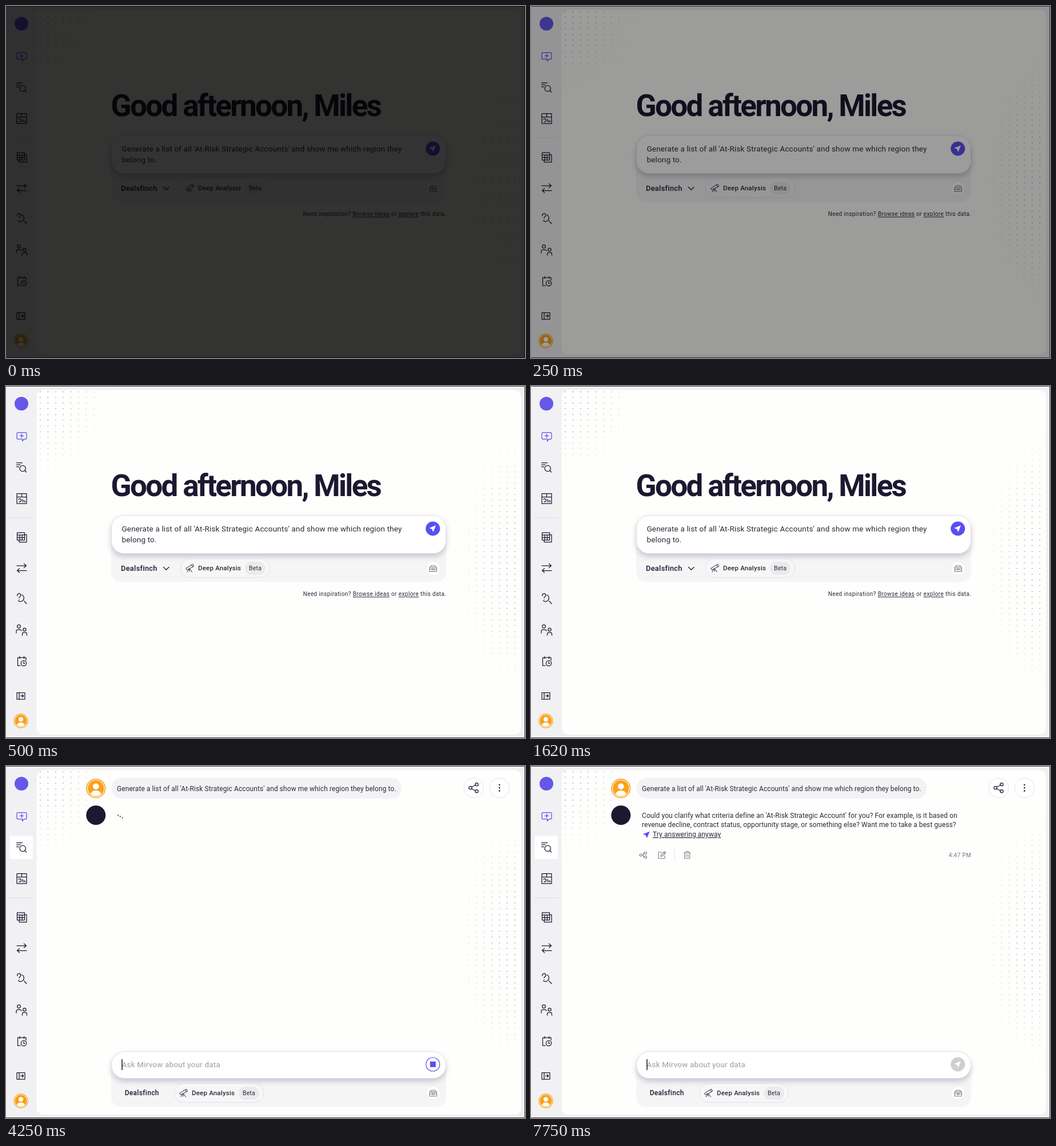
Write an HTML page that moves like this. It is 908x617 px and loops after 8 s.

```html
<!DOCTYPE html>
<html lang="en">
<head>
<meta charset="utf-8">
<title>Assistant chat</title>
<style>
  :root { --ink: #1b1830; --text: #2c2a38; --violet: #5b4ef2; --amber: #f9a11b; --line: #dfdfe6; }
  html, body { margin: 0; width: 100%; height: 100%; overflow: hidden; background: #f1f1f3; }
  svg { display: block; width: 908px; height: 617px; font-family: Roboto, "Open Sans", sans-serif; }
  text { fill: var(--text); }

  .title { font-size: 53px; font-weight: 700; letter-spacing: -2.7px; fill: var(--ink); }
  .prompt { font-size: 13.5px; letter-spacing: .15px; }
  .hint { fill: #9b9ba3; letter-spacing: .2px; }
  .msg { font-size: 12px; letter-spacing: .085px; }
  .source { font-size: 12.8px; font-weight: 500; letter-spacing: .3px; fill: var(--ink); }
  .tool { font-size: 11.5px; font-weight: 500; letter-spacing: .2px; }
  .badge { font-size: 10.5px; letter-spacing: .2px; }
  .small { font-size: 10px; letter-spacing: .4px; }
  .link { text-decoration: underline; text-decoration-color: #8a8a92; text-underline-offset: 2.5px; }

  .icon { fill: none; stroke: var(--ink); stroke-width: 1.25; stroke-linejoin: round; stroke-linecap: round; }
  .thin { stroke-width: .95; }
  .grey { stroke: #7c7c84; stroke-width: 1.1; }
  .violet { stroke: var(--violet); }
  .card { fill: #fff; stroke: var(--line); filter: url(#lift); }
  .tray { fill: #f5f5f6; }
  .ring { fill: #fff; stroke: #e3e3ea; }

  /* All timing is on a grid of 125 ms in a loop of 8 s. */
  .fade, .home, .chat, .wait, .busy, .link-in, .done, .caret { animation: 8s step-end -5ms infinite; }
  .fade { animation-name: fade; }
  .home { animation-name: home; }
  .chat { animation-name: chat; }
  .wait { animation-name: wait; }
  .busy { animation-name: busy; }
  .link-in { animation-name: link-in; }
  .done { animation-name: done; }
  .caret { animation-name: caret; }
  .send { fill: var(--violet); animation: hover 8s linear infinite; }
  .wait circle { animation: bob 1s ease-in-out infinite; }
  .word { fill: transparent; animation: word 8s step-end infinite; }

  @keyframes fade {
    0% { opacity: .8 } 1.5625% { opacity: .6 } 3.125% { opacity: .39 }
    4.6875% { opacity: .19 } 6.25%, 100% { opacity: 0 }
  }
  @keyframes home { 0% { opacity: 1 } 43.75%, 100% { opacity: 0 } }
  @keyframes chat { 0% { opacity: 0 } 43.75%, 100% { opacity: 1 } }
  @keyframes wait { 0% { opacity: 1 } 65.625%, 100% { opacity: 0 } }
  @keyframes busy { 0% { opacity: 1 } 84.375%, 100% { opacity: 0 } }
  @keyframes link-in { 0% { opacity: 0 } 82.8125%, 100% { opacity: 1 } }
  @keyframes done { 0% { opacity: 0 } 84.375%, 100% { opacity: 1 } }
  @keyframes caret {
    0%, 50%, 59.375%, 68.75%, 78.125%, 87.5%, 96.875%, 100% { opacity: 1 }
    45.3125%, 54.6875%, 64.0625%, 73.4375%, 82.8125%, 92.1875% { opacity: 0 }
  }
  @keyframes hover {
    0%, 20% { fill: #5b4ef2 } 28.1%, 34% { fill: #4c40d4 } 40.6%, 100% { fill: #5b4ef2 }
  }
  @keyframes bob { 0%, 100% { transform: translateY(-2.5px) } 50% { transform: translateY(2.5px) } }
  @keyframes word { 0% { fill: #2c2a38 } 35%, 100% { fill: transparent } }
</style>
</head>
<body>
<svg viewBox="0 0 908 617">
  <defs>
    <filter id="lift" x="-5%" y="-30%" width="110%" height="180%">
      <feDropShadow dx="0" dy="5" stdDeviation="5" flood-color="#1b1830" flood-opacity=".2"/>
    </filter>
    <pattern id="dots" x="53.3" y="5" width="13.39" height="10" patternUnits="userSpaceOnUse">
      <circle cx="6.7" cy="5" r="1.15" fill="#c6c6ce"/>
    </pattern>
    <radialGradient id="glow">
      <stop offset=".35" stop-color="#fff"/>
      <stop offset="1" stop-color="#fff" stop-opacity="0"/>
    </radialGradient>
    <mask id="corners">
      <ellipse cx="54" cy="8" rx="140" ry="155" fill="url(#glow)"/>
      <ellipse cx="900" cy="308" rx="118" ry="232" fill="url(#glow)"/>
    </mask>
    <path id="plane" d="M5.6-5.8-6.2-.9-1.2 1 .9 6Z"/>
    <g id="person">
      <circle r="16.2" fill="#fff" stroke="#f9a11b" stroke-width="1.6"/>
      <circle r="14.2" fill="#f9a11b"/>
      <circle cy="-3.6" r="5.3" fill="#fff"/>
      <path d="M-9 9.6C-8 1.6 8 1.6 9 9.6A13 13 0 0 1-9 9.6Z" fill="#fff"/>
    </g>
    <g id="tools">
      <rect x="305.5" y="303" width="156" height="32.5" rx="16.2" fill="#f7f7f8" stroke="#e2e2e9"/>
      <path class="icon thin" d="M315 319.5l9.5-6 2.2 3.6-10 5.2ZM324.5 313.5l2.2-1.2 2 3.5-2 1.3M320 321l-3 5M321.5 320.5l4 5.5M321 321v4"/>
      <text class="tool" x="336" y="323.4">Deep Analysis</text>
      <rect x="418" y="308" width="36" height="23" rx="11.5" fill="#ebebed"/>
      <text class="badge" x="425" y="323.4">Beta</text>
    </g>
    <g id="kit">
      <circle r="12.2" fill="#fff" stroke="#ececf0"/>
      <path class="icon grey" d="M-6.2-2.2H6.2V5.4H-6.2ZM-4.6-2.2-3.4-5H3.4L4.6-2.2M-6.2 1.2H-1.5M1.5 1.2H6.2M-1.5 0H1.5V2.6H-1.5Z"/>
    </g>
  </defs>

  <rect width="908" height="617" fill="#f1f1f3"/>
  <rect x="53.5" y="7" width="847.5" height="604" rx="12" fill="#fefefd"/>
  <rect x="54" y="7" width="841" height="604" fill="url(#dots)" mask="url(#corners)"/>

  <g class="chat">
    <rect x="6.5" y="122.5" width="40.5" height="40.5" rx="3" fill="#fff"/>
  </g>

  <!-- sidebar -->
  <circle cx="27" cy="31" r="12" fill="#6557e8"/>
  <path stroke="#dcdce3" d="M6 231H47"/>
  <g class="icon">
    <path class="violet" d="M21 81.5H34Q36 81.5 36 83.5V91Q36 93 34 93H31.5L28.5 96.5V93H21Q19 93 19 91V83.5Q19 81.5 21 81.5ZM27.5 84V90.5M24.2 87.3H30.8"/>
    <path d="M18.5 134.5H28.5M18.5 138H25M18.5 141.5H22.5M32.9 148.3 35.5 151"/>
    <circle cx="29.2" cy="144.5" r="5.2"/>
    <path d="M19 188.5H36V206H19ZM19 194.5H36M27.5 188.5V194.5M22 198.5A2.6 2.6 0 1 1 23 202.8M29 198.5V203M31.5 200.5V203M33.5 201.5V203"/>
    <path d="M19.5 257H32.5V270H19.5ZM19.5 261.2H32.5M19.5 265.6H32.5M24 261.2V270M28.3 261.2V270M32.5 260.5H36V273.5H23V270"/>
    <path d="M19 315H35.5M31.5 311.5 35.5 315 31.5 318.5M36 323.5H19.5M23.5 320 19.5 323.5 23.5 327"/>
    <path d="M20 367.8A3 3 0 1 1 24.2 369.5Q23 370.2 23 371.5M23 374.3V374.5M28 366A6.2 6.2 0 1 1 21.5 376.5M31.8 377 36 381.5"/>
    <circle cx="22.5" cy="421.5" r="2.8"/>
    <circle cx="32.5" cy="427" r="2.6"/>
    <path d="M18 433V430Q18 427 21 427H24Q26.5 427 27 429M28.5 437V435Q28.5 432.2 31 432.2H34Q36.5 432.2 36.5 435V437"/>
    <path d="M25 490H20.5V476H35V480.5M24 474V477.5M31.5 474V477.5"/>
    <circle cx="31" cy="486" r="4.7"/>
    <path d="M31 483.5V486.3H33"/>
    <path d="M19 537.5H33V549H19ZM23 537.5V549M25.5 543.2H30.5M28.5 541 30.7 543.2 28.5 545.5"/>
  </g>
  <use href="#person" transform="translate(26 587) scale(.75)"/>

  <g class="home">
    <text class="title" x="183.5" y="192.5">Good afternoon, Miles</text>
    <path class="tray" d="M184 270H770V324Q770 343.5 750 343.5H204Q184 343.5 184 324Z"/>
    <rect class="card" x="184.5" y="227" width="585" height="66.5" rx="22"/>
    <text class="prompt">
      <tspan x="202.5" y="255">Generate a list of all 'At-Risk Strategic Accounts' and show me which region they</tspan>
      <tspan x="202.5" y="274.3">belong to.</tspan>
    </text>
    <circle class="send" cx="746.8" cy="250" r="12.5"/>
    <use href="#plane" x="746.5" y="250" fill="#fff"/>
    <text class="source" x="201" y="324.2">Dealsfinch</text>
    <path class="icon" d="M275.5 317.5 280.3 322.3 285 317.5"/>
    <use href="#tools"/>
    <use href="#kit" x="747.3" y="319.7"/>
    <text class="small" x="770.4" y="368.4" text-anchor="end">Need inspiration? <tspan class="link">Browse ideas</tspan> or <tspan class="link">explore</tspan> this data.</text>
  </g>

  <g class="chat">
    <use href="#person" x="157.3" y="39.3"/>
    <rect x="184.5" y="21" width="507.5" height="36" rx="17" fill="#f3f3f5"/>
    <text class="msg" x="194" y="43.7">Generate a list of all 'At-Risk Strategic Accounts' and show me which region they belong to.</text>
    <circle class="ring" cx="818.3" cy="38.3" r="17.2"/>
    <circle class="ring" cx="863.3" cy="38.3" r="17.2"/>
    <g class="icon">
      <path d="M814.5 37 821.5 33.2M814.5 39.8 821.5 43.5"/>
      <circle cx="812.5" cy="38.3" r="2.6"/>
      <circle cx="823.5" cy="32.3" r="2.6"/>
      <circle cx="823.5" cy="44.3" r="2.6"/>
    </g>
    <path d="M863.3 33V33M863.3 38.3V38.3M863.3 43.6V43.6" stroke="#1b1830" stroke-width="2.6" stroke-linecap="round"/>
    <circle cx="157.3" cy="86.3" r="17" fill="#1b1830"/>

    <g class="wait" fill="#1b1830">
      <circle cx="196" cy="88.5" r="1.05" style="animation-delay:-750ms"/>
      <circle cx="199.8" cy="88.5" r="1.05" style="animation-delay:-500ms"/>
      <circle cx="203.6" cy="88.5" r="1.05" style="animation-delay:-250ms"/>
    </g>
    <text class="msg" id="reply"></text>

    <g class="link-in">
      <use href="#plane" x="202" y="120.5" fill="#5b4ef2"/>
      <text class="msg link" x="213" y="124">Try answering anyway</text>
    </g>
    <g class="done">
      <g class="icon grey">
        <circle cx="192" cy="156" r="2"/>
        <circle cx="200.5" cy="152.5" r="2"/>
        <circle cx="200.5" cy="159.5" r="2"/>
        <path d="M194 156H196.5V152.5H198.5M196.5 156V159.5H198.5"/>
        <path d="M229 151H223V162H234V157M227 158.5 227.8 155.5 233.5 149.8 235.7 152 230 157.8ZM231.8 151.5 234 153.7"/>
        <path d="M267.5 152H279M271 152V149.8H275.5V152M268.7 152V162H277.8V152M271.7 154.7V159.3M274.8 154.7V159.3"/>
      </g>
      <path d="M251.5 145V168" stroke="#e2e2e8"/>
      <text class="small" x="770.4" y="159.8" text-anchor="end" style="fill:#77777f">4:47 PM</text>
    </g>

    <path class="tray" d="M184 524H770V578Q770 597.5 750 597.5H204Q184 597.5 184 578Z"/>
    <rect class="card" x="184.5" y="500.5" width="585" height="47" rx="23"/>
    <text class="prompt hint" x="202.5" y="528.2">Ask Mirvow about your data</text>
    <path class="caret" d="M203 514V533" stroke="#1b1830" stroke-width="1.5"/>
    <g class="busy">
      <circle cx="746.8" cy="523" r="12" fill="#fff" stroke="#5b4ef2" stroke-width="1.2"/>
      <rect x="742" y="518" width="9.8" height="9.8" fill="#5b4ef2"/>
    </g>
    <g class="done">
      <circle cx="746.8" cy="523" r="12.5" fill="#cfcfd3"/>
      <use href="#plane" x="746.5" y="523" fill="#fff"/>
    </g>
    <text class="source" x="207.7" y="577.3" style="font-size:12px">Dealsfinch</text>
    <use href="#tools" x="-11" y="254"/>
    <use href="#kit" x="747.3" y="573.3"/>
  </g>

  <path d="M0 .5H907.5V616.5H0" fill="none" stroke="#4a4a50"/>
  <rect class="fade" width="908" height="617"/>
</svg>

<script>
  const lines = [
    "Could you clarify what criteria define an 'At-Risk Strategic Account' for you? For example, is it based on",
    "revenue decline, contract status, opportunity stage, or something else? Want me to take a best guess?"
  ];
  const STEP = 125, FIRST = 41, WORDS_PER_STEP = 23 / 7;
  const reply = document.getElementById("reply");

  const tspan = parent =>
    parent.appendChild(document.createElementNS("http://www.w3.org/2000/svg", "tspan"));

  let count = 0;
  lines.forEach((line, row) => {
    const rowSpan = tspan(reply);
    rowSpan.setAttribute("x", 194);
    rowSpan.setAttribute("y", 90.5 + row * 16.7);
    for (const word of line.split(" ")) {
      const span = tspan(rowSpan);
      const step = FIRST + Math.ceil(++count / WORDS_PER_STEP - 1e-6);
      span.setAttribute("class", "word");
      span.style.animationDelay = step * STEP - 5 + "ms";
      span.textContent = word + " ";
    }
  });
</script>
</body>
</html>
```
